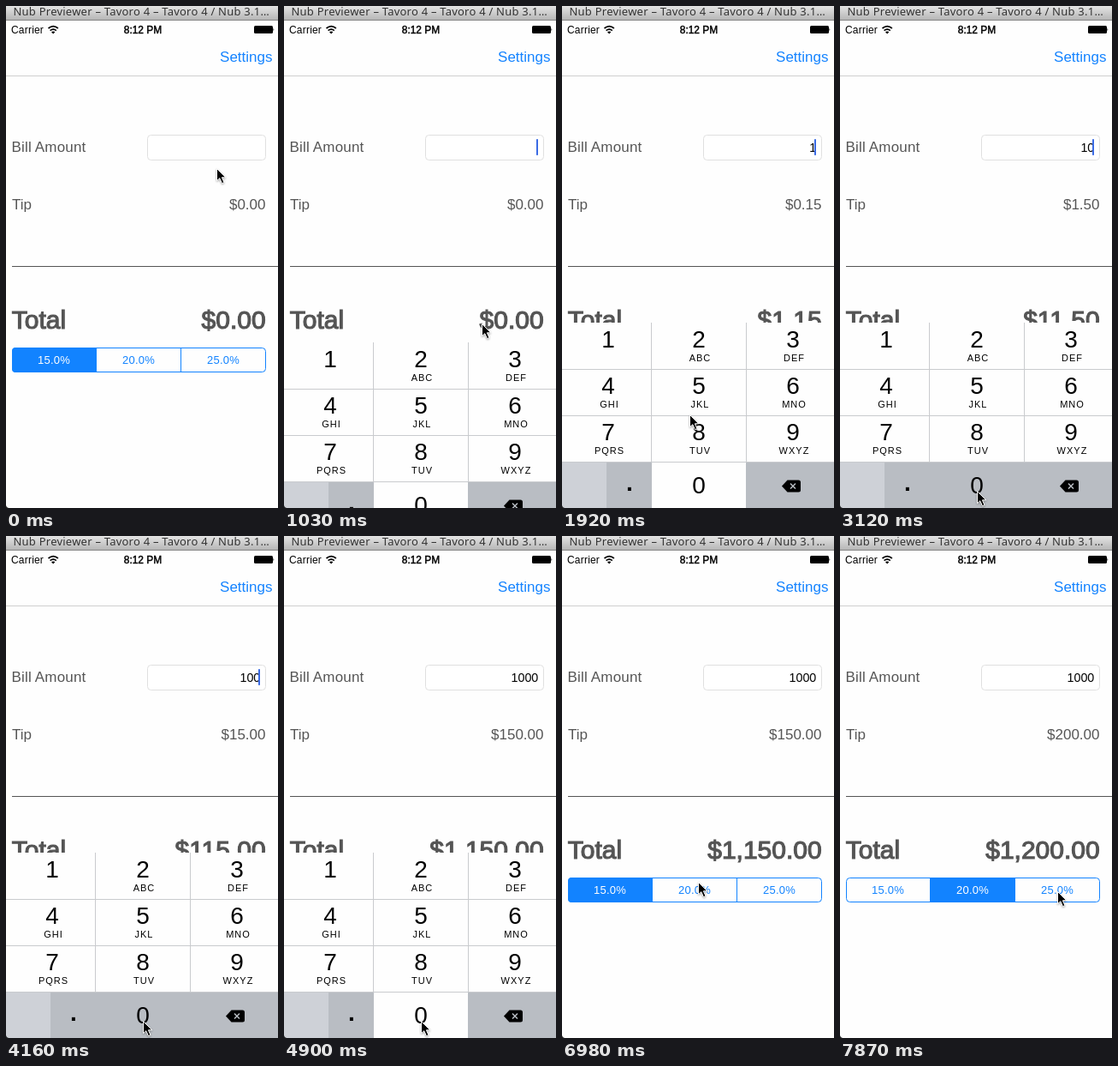
Recreate the animation shown at these times as an HTML page. Size 318 px wide and 585 px high, loop 8000 ms.

```html
<!DOCTYPE html>
<html lang="en">
<head>
<meta charset="utf-8">
<title>Tip calculator</title>
<style>
html, body { margin: 0; width: 100%; height: 100%; overflow: hidden; background: #fefefe; }
svg { display: block; width: 318px; height: 585px; font-family: "Liberation Sans", Arial, sans-serif; }
.label { font-size: 17px; fill: #555; }
.big { font-size: 30px; fill: #555; stroke: #555; stroke-width: 1.2px; }
.end { text-anchor: end; }
.mid { text-anchor: middle; }
.seg { font-size: 13px; letter-spacing: .2px; }
.digit { font-size: 28px; }
.letters { font-size: 11px; letter-spacing: 1px; }
</style>
</head>
<body>
<svg viewBox="0 0 318 585">
  <defs>
    <linearGradient id="chrome" x2="0" y2="1">
      <stop stop-color="#e4e4e4"/><stop offset="1" stop-color="#b6b6b6"/>
    </linearGradient>
    <clipPath id="pill"><rect x="7" y="398" width="297" height="29" rx="4"/></clipPath>
  </defs>
  <rect width="318" height="585" fill="#fefefe"/>

  <rect width="318" height="16" fill="url(#chrome)"/>
  <rect y="16" width="318" height="1" fill="#858585"/>
  <text x="8.5" y="11" font-size="13" letter-spacing=".23" fill="#333" style="font-family:'Noto Sans',sans-serif">Nub Previewer – Tavoro 4 – Tavoro 4 / Nub 3.1…</text>

  <text x="6" y="31.5" font-size="12" letter-spacing=".2">Carrier</text>
  <g fill="none" stroke="#000" stroke-width="1.7">
    <path d="M49.5 26q5.7-4.8 11.4 0M51.6 28.6q3.6-3 7.2 0"/>
  </g>
  <path d="M53 30.2q2.2-1.6 4.4 0L55.2 32.4Z"/>
  <text class="mid" x="160" y="31.5" font-size="11.9" stroke="#000" stroke-width=".45">8:12 PM</text>
  <rect x="290" y="23" width="22" height="9" rx="1.5"/>
  <path d="M312.5 25.7q1.6 1.8 0 3.6Z"/>

  <text class="end" x="311.5" y="65" font-size="17" fill="#1483ff">Settings</text>
  <rect y="81" width="318" height="1" fill="#cfcfcf"/>

  <text class="label" x="6.5" y="169.5" letter-spacing=".18">Bill Amount</text>
  <rect x="165.5" y="150.5" width="138" height="29" rx="4" fill="#fff" stroke="#e0e0e0"/>
  <text id="bill" class="end" x="297.3" y="169.5" font-size="14.3"></text>
  <rect id="caret" x="295" y="155" width="2" height="19" rx=".8" fill="#3a6ae4"/>
  <text class="label" x="7" y="236.5">Tip</text>
  <text id="tip" class="label end" x="303.5" y="236.5"></text>
  <rect x="7" y="303" width="311" height="1" fill="#555"/>
  <text class="big" x="6.8" y="376.3">Total</text>
  <text id="total" class="big end" x="303.7" y="376.3"></text>

  <rect id="chosen" y="398" width="99" height="29" fill="#1283ff" clip-path="url(#pill)"/>
  <path d="M105.5 398V427M204.5 398V427" stroke="#1283ff"/>
  <rect x="7.5" y="398.5" width="296" height="28" rx="4" fill="none" stroke="#1283ff"/>
  <g id="segments"></g>

  <g id="pad"></g>
  <path d="M0 582Q.5 584.5 3 585H0Z" fill="#222"/>
  <path id="pointer" d="M0 0V14.2L3.3 11.2L6 17.2L8.5 16.1L5.9 10.3H10.4Z" stroke="#fff" stroke-width="1" style="filter:drop-shadow(0 1px 1px rgba(0,0,0,.35))"/>
</svg>
<script>
const $ = id => document.getElementById(id);
const LOOP = 8000, STEP = 148.4, LEAD = 12;
const PAD_TOP = 369, PAD_H = 216, KEY_H = 54;
const WHITE = '#fefefe', GREY = '#b9bdc3';
const RATES = [.15, .2, .25];
const LETTERS = ['', 'ABC', 'DEF', 'GHI', 'JKL', 'MNO', 'PQRS', 'TUV', 'WXYZ'];
const COLS = [{ x: 0, w: 104, c: 54 }, { x: 105, w: 110, c: 160 }, { x: 216, w: 102, c: 270 }];

// [step, text in the bill field]
const TYPED = [[0, ''], [11, '1'], [20, '10'], [22, '100'], [29, '1000']];
// [step, pressed key]
const PRESSES = [[10, 1], [19, 0], [21, 0], [28, 0]];
const FOCUS = 6, BLUR = 40, PICK = 49;
// [step, x, y] of the pointer tip
const PATH = [
  [0, 246, 190], [4, 253, 169], [5, 253, 169], [6, 247, 245], [7, 231, 371],
  [8, 145, 385], [9, 70, 392], [10, 55, 392], [11, 55, 392], [13, 149, 477],
  [14, 154, 515], [16, 159, 555], [18, 160, 566], [34, 160, 566], [36, 168, 490],
  [38, 184, 310], [40, 190, 254], [41, 190, 254], [43, 186, 290], [46, 162, 395],
  [48, 155, 412], [49, 155, 412], [51, 195, 411], [53, 254, 415]
];

function keyRect(col, row, id) {
  const { x, w } = COLS[col];
  return `<rect id="key${id}" x="${x}" y="${row * KEY_H}" width="${w}" height="${KEY_H}" fill="${WHITE}"/>`;
}

function buildPad() {
  let out = `<rect width="318" height="${PAD_H}" fill="${GREY}"/>`;
  LETTERS.forEach((letters, i) => {
    const col = i % 3, row = Math.floor(i / 3), { c } = COLS[col], y = row * KEY_H;
    out += keyRect(col, row, i + 1) +
      `<text class="digit mid" x="${c}" y="${y + 29}">${i + 1}</text>` +
      `<text class="letters mid" x="${c + 1.5}" y="${y + 44.7}">${letters}</text>`;
  });
  out += keyRect(1, 3, 0) +
    `<text class="digit mid" x="160" y="199">0</text>
    <rect y="162" width="52" height="54" fill="#ced1d7"/>
    <text class="digit mid" x="79" y="196" font-weight="bold">.</text>
    <path d="M257 190.5L263.5 183.5H276.5Q279 183.5 279 186V195Q279 197.5 276.5 197.5H263.5Z"/>
    <path d="M267 187.5L273 193.5M273 187.5L267 193.5" stroke="${GREY}" stroke-width="1.5"/>
    <path d="M104.5 0V162M215.5 0V162M0 54.5H318M0 108.5H318M0 162.5H318" stroke="#c9cbce"/>`;
  $('pad').innerHTML = out;
}

function buildSegments() {
  $('segments').innerHTML = RATES.map((rate, i) =>
    `<text class="seg mid" x="${56 + i * 99}" y="417">${(rate * 100).toFixed(1)}%</text>`).join('');
}

const money = n => '$' + n.toLocaleString('en-US', { minimumFractionDigits: 2, maximumFractionDigits: 2 });
const latest = (list, k) => list.filter(e => e[0] <= k).pop();

function pointerAt(k) {
  const i = PATH.findIndex(p => p[0] >= k);
  if (i < 1) return PATH[i ? PATH.length - 1 : 0].slice(1);
  const a = PATH[i - 1], b = PATH[i], f = (k - a[0]) / (b[0] - a[0]);
  return [1, 2].map(n => a[n] + (b[n] - a[n]) * f);
}

function padOffset(k) {
  const decay = from => PAD_H * Math.exp(-1.5 * (k - from));
  if (k < FOCUS) return PAD_H;
  if (k < BLUR + 2) return decay(FOCUS - .5);
  return PAD_H - decay(BLUR + 1.5);
}

function caretAlpha(k, since) {
  if (k < FOCUS || k >= BLUR) return 0;
  return [1, 1, 1, .5, 0, 0, 1][(k - Math.max(since, FOCUS)) % 7];
}

function draw(time) {
  const k = Math.min(53, Math.floor((time % LOOP + LEAD) / STEP));
  const [since, text] = latest(TYPED, k);
  const pick = k < PICK ? 0 : 1;
  const bill = Number(text), tip = bill * RATES[pick];

  $('bill').textContent = text;
  $('tip').textContent = money(tip);
  $('total').textContent = money(bill + tip);
  $('caret').setAttribute('opacity', caretAlpha(k, since));

  $('chosen').setAttribute('x', 7 + pick * 99);
  [...$('segments').children].forEach((el, i) => el.setAttribute('fill', i === pick ? '#fff' : '#1283ff'));

  const press = PRESSES.find(p => p[0] === k);
  for (let n = 0; n < 10; n++) $('key' + n).setAttribute('fill', press && press[1] === n ? GREY : WHITE);
  $('pad').setAttribute('transform', `translate(0 ${PAD_TOP + Math.round(padOffset(k))})`);

  const [x, y] = pointerAt(k);
  $('pointer').setAttribute('transform', `translate(${Math.round(x) + .5} ${Math.round(y) - .5})`);
}

buildPad();
buildSegments();
const start = performance.now();
(function tick() {
  draw(performance.now() - start);
  requestAnimationFrame(tick);
})();
</script>
</body>
</html>
```
